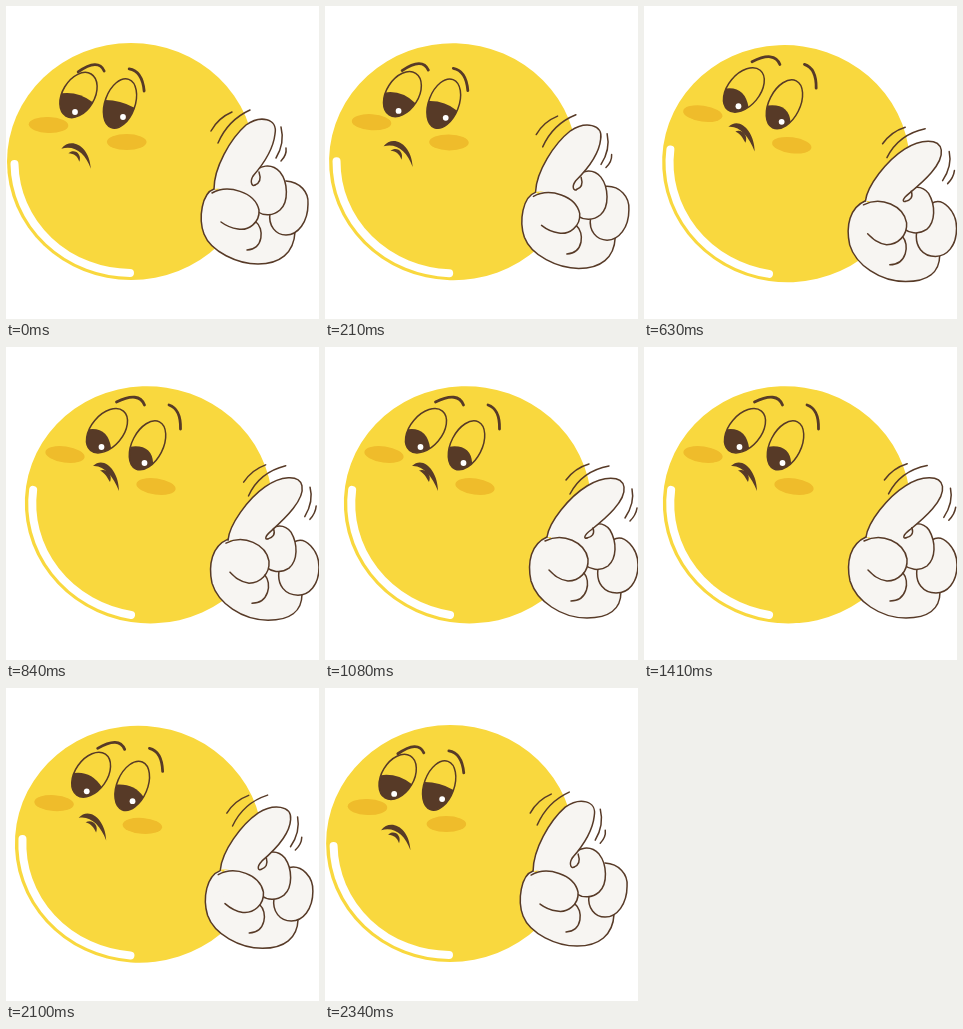
Write an HTML page that moves like this. It is 313x313 px and loops after 2370 ms.

```html
<!DOCTYPE html>
<html>
<head>
<meta charset="utf-8">
<style>
html, body { margin: 0; width: 100%; height: 100%; overflow: hidden; background: #fff; }
svg { display: block; width: 100vw; height: 100vh; }
.line { fill: none; stroke: #573a27; stroke-width: 1.5; stroke-linecap: round; }
.skin { fill: #f7f5f2; stroke: #573a27; stroke-width: 1.5; stroke-linecap: round; stroke-linejoin: round; }
.palm { fill: #f7f5f2; }
.brow { fill: none; stroke: #573a27; stroke-width: 2.8; stroke-linecap: round; }
.dark { fill: #573a27; }
.cheek { fill: #efbc2b; }
.white { fill: #fff; }
</style>
</head>
<body>
<svg viewBox="0 0 313 313">
  <g id="body">
    <ellipse cx="125" cy="155.5" rx="124" ry="118.5" fill="#f9d83e"/>
    <path d="M8.5 158A116.5 111 0 0 0 124 267" fill="none" stroke="#fff" stroke-width="8" stroke-linecap="round"/>
  </g>
  <g id="face"></g>
  <g id="hand"><g id="back"></g><g id="swish"></g><g id="finger"></g><g id="front"></g></g>
</svg>
<script>
const LOOP = 2370;
const el = id => document.getElementById(id);
const clamp = x => Math.min(1, Math.max(0, x));
const ease = x => (1 - Math.cos(Math.PI * clamp(x))) / 2;
const bump = x => Math.sin(Math.PI * clamp(x));
const lerp = (a, b, p) => a + (b - a) * p;

// 0 = leaning back, 1 = leaning forward
function lean(t) {
  t = (t + LOOP) % LOOP;
  return ease((t - 20) / 700) - ease((t - 1790) / 580);
}

function add(parent, tag, cls) {
  const node = document.createElementNS('http://www.w3.org/2000/svg', tag);
  node.setAttribute('class', cls);
  return el(parent).appendChild(node);
}

const parts = [];

// A path that morphs between two poses with the same commands
function morph(parent, cls, from, to, delay = 0) {
  const node = add(parent, 'path', cls);
  const ends = to.match(/[\d.]+/g);
  parts.push(t => {
    const p = lean(t - delay);
    let i = 0;
    node.setAttribute('d', from.replace(/[\d.]+/g, n => lerp(+n, +ends[i++], p).toFixed(2)));
  });
}

// Pose: x, y, rotation
function cheek(from, to, delay) {
  const node = add('face', 'ellipse', 'cheek');
  node.setAttribute('rx', 19.8);
  node.setAttribute('ry', 8);
  parts.push(t => {
    const [x, y, r] = from.map((v, i) => lerp(v, to[i], lean(t - delay)));
    node.setAttribute('transform', `translate(${x} ${y}) rotate(${r})`);
  });
}

// Pose: centre, radii, rotation, iris start and end angle, lid control point, glint
function eye(from, to) {
  const iris = add('face', 'path', 'dark');
  const rim = add('face', 'ellipse', 'line');
  const glint = add('face', 'circle', 'white');
  glint.setAttribute('r', 2.9);
  parts.push(t => {
    const [cx, cy, rx, ry, rot, start, end, qx, qy, gx, gy] =
      from.map((v, i) => lerp(v, to[i], lean(t)));
    const rad = Math.PI / 180, c = Math.cos(rot * rad), s = Math.sin(rot * rad);
    const at = deg => {
      const x = rx * Math.cos(deg * rad), y = ry * Math.sin(deg * rad);
      return `${cx + x * c - y * s} ${cy + x * s + y * c}`;
    };
    iris.setAttribute('d', `M${at(start)}A${rx} ${ry} ${rot} 0 1 ${at(end)}Q${qx} ${qy} ${at(start)}`);
    rim.setAttribute('rx', rx);
    rim.setAttribute('ry', ry);
    rim.setAttribute('transform', `translate(${cx} ${cy}) rotate(${rot})`);
    glint.setAttribute('cx', gx);
    glint.setAttribute('cy', gy);
  });
}

cheek([42.5, 119, 2], [59, 107.5, 8], -40);
cheek([120.5, 136, 0], [150, 139.5, 8], 35);
eye([72.5, 89, 16, 24.5, 31, -3, 163, 72, 85, 69, 106], [101, 83.7, 16, 25.6, 40, 25, 156, 102, 80, 95.5, 100]);
eye([114, 97.5, 15, 25.7, 20, -2, 176, 114, 94, 117, 111], [141.5, 98.3, 15.5, 26.3, 27, 31, 160, 146, 97, 138.5, 116]);
morph('face', 'brow', 'M72 66Q92 52 98 65', 'M110.5 55Q133 44 138.5 58', 25);
morph('face', 'brow', 'M123 63Q136 65 138 85', 'M163 58Q175 62 174.5 82', 25);
morph('face', 'dark', 'M55 143C64 131 83 139 84.5 163C79 147 68 139 55 143Z',
  'M87 119C98 108 113 124 113 144C107 129 98 118 87 119Z', 40);
morph('face', 'dark', 'M62 147.5C68 142 76 148 73 156C71 150 68 148 62 147.5Z',
  'M94 123.5C101 121 107 128 104 135C101 130 99 126 94 123.5Z', 40);

morph('back', 'palm', 'M212 183L262 165L285 190L280 235L215 225Z', 'M226 190L272 182L292 200L288 250L225 240Z');
morph('back', 'skin', 'M208 183C196 187 192 212 198 228C205 246 232 258 252 258C274 258 288 247 289 226',
  'M222 190C206 197 202 215 206 234C212 254 236 271 262 271C284 271 296 262 296 245');
morph('back', 'skin', 'M280 175C294 176 303 186 302 198C302 216 292 229 280 229C270 229 262 220 264 207',
  'M288 193C299 186 313 201 313 218C313 236 303 246 292 246C279 246 271 236 273 222');
morph('back', 'skin', 'M247 170C252 158 266 157 274 166C282 176 283 196 274 204C267 210 258 210 252 206',
  'M262 184C268 174 279 175 285 183C292 195 292 211 283 219C274 225 265 222 260 218');

morph('finger', 'skin', 'M208 183C208 162 224 133 240 119C254 109 272 112 269 128C267 146 254 162 247 170C243 177 247 181 249 179',
  'M222 190C224 175 244 150 262 139C278 129 297 128 299 140C301 154 281 171 266 183C258 189 259 192 262 191');
morph('finger', 'line', 'M253 166C255 172 254 177 249 179', 'M268 181C270 187 267 190 262 191');
morph('swish', 'line', 'M205 125Q212 112 226 106', 'M241 133Q250 121 264 117');
morph('swish', 'line', 'M212 137Q222 114 244 104', 'M245 147Q257 124 284 119');
morph('finger', 'line', 'M275 121Q279 137 270 152', 'M307 142Q310 156 300 171');
morph('finger', 'line', 'M280 142Q281 149 275 155', 'M312 161Q311 168 305 174');

morph('front', 'skin', 'M206 187C222 178 249 186 253 204C254 217 242 225 232 223C225 222 219 219 215 216',
  'M220 194C238 185 260 195 263 212C264 225 254 234 243 234C234 233 229 228 224 223');
morph('front', 'line', 'M250 216C258 222 258 243 241 244', 'M259 226C266 234 263 254 246 254');

function draw(now) {
  const t = now % LOOP, p = lean(t);
  parts.forEach(update => update(t));
  el('body').setAttribute('transform', `translate(0 ${p}) rotate(${8.6 * p} 125 274)`);
  const dip = 5.5 * bump((t - 100) / 850) - 3.5 * bump((t - 1850) / 490);
  el('hand').setAttribute('transform', `translate(0 ${dip})`);
  // The finger wags while held forward and swings wide on the way
  const wag = -2 * p ** 4 * (1 - Math.cos(2 * Math.PI * (t - 1080) / 380));
  const swing = 10 * p * (1 - p);
  el('swish').setAttribute('transform', `rotate(${wag} 240 190)`);
  el('finger').setAttribute('transform', `rotate(${wag + swing} 240 190)`);
  requestAnimationFrame(() => draw(performance.now() - begin));
}
const begin = performance.now();
draw(0);
</script>
</body>
</html>
```
